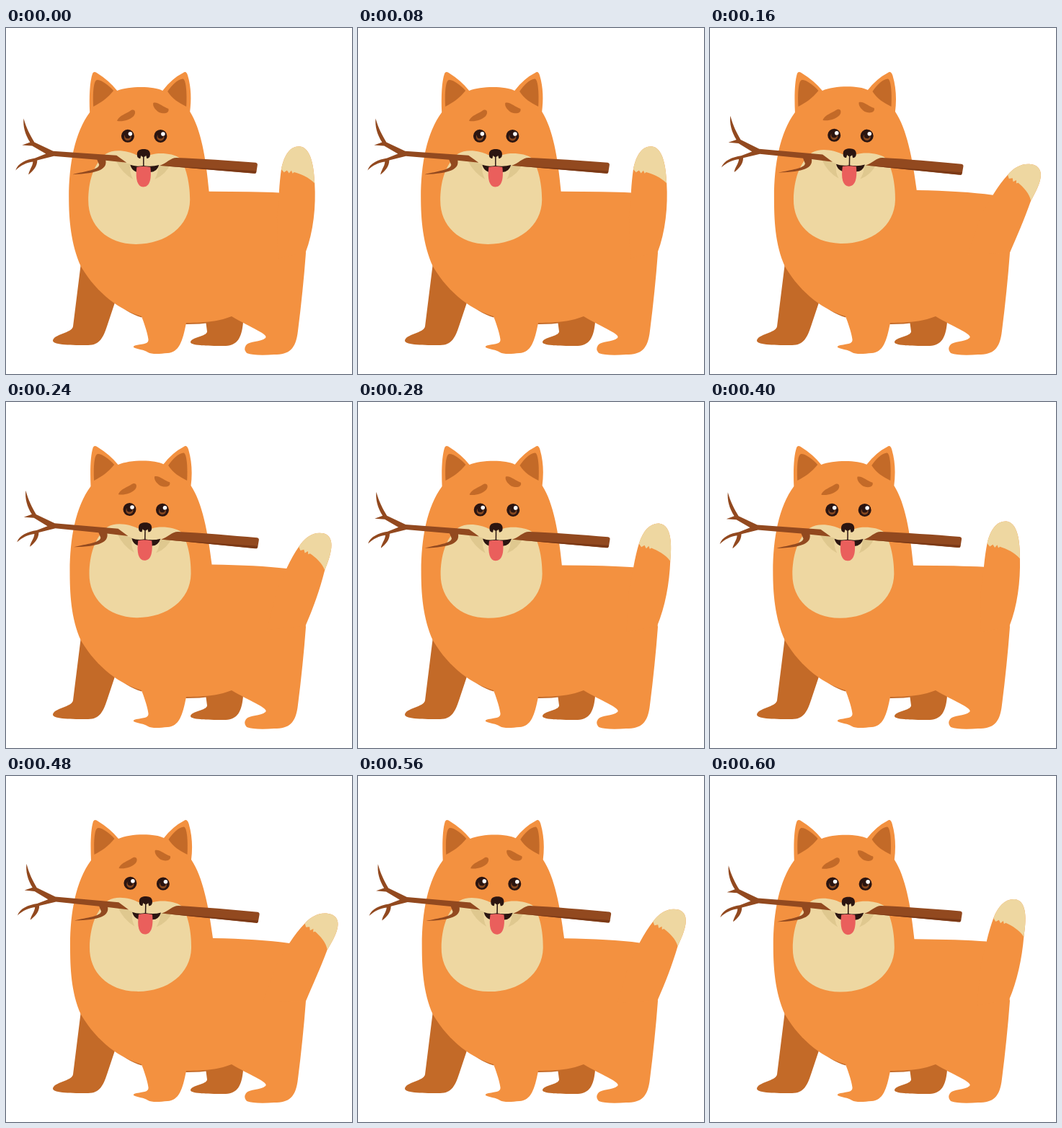
These frames come from a looping animation (480 by 480 pixels, 0.64 s). An HTML page:

```html
<!DOCTYPE html>
<html lang="en">
<head>
<meta charset="utf-8">
<title>Dog with a stick</title>
<style>
html, body { margin: 0; width: 100%; height: 100%; overflow: hidden; background: #fff; }
svg { display: block; width: 100vw; height: 100vh; }
.coat { fill: #f39140; }
.dark { fill: #c36a28; }
.cream { fill: #eed7a1; }
.shade { fill: #dfc88f; }
.bark { fill: #92491f; }
.ink { fill: #2b1511; }
</style>
</head>
<body>
<svg viewBox="0 0 480 480">
  <!-- far legs and belly shadow -->
  <g class="dark">
    <path d="M104 326L93 414C92 423 65 425 65 434C66 440 92 440 114 440C130 440 135 429 140 414L152 378Z"/>
    <path d="M277 406L279 421C279 428 256 429 256 436C257 441 284 441 305 441C321 440 327 430 329 408L313 398Z"/>
    <path d="M148 376C160 389 174 397 188 401.500L194 396ZM249 411Q290 411 314 401L250 402Z"/>
  </g>
  <path id="body" class="coat"/>
  <g id="tail">
    <path id="brush" class="coat"/>
    <path id="tip" class="cream"/>
  </g>
  <g id="ears" class="dark">
    <path d="M121 109C120 92 121 73 126 72C133 72 143 80 149 87C141 97 131 104 121 109Z"/>
    <path d="M250 109C251 92 250 71 245 70.500C237 72 230 79 224 88C230 98 240 104 250 109Z"/>
  </g>
  <g id="brows" class="dark">
    <path d="M154 128C158 121 166 119 172 115C178 111 181 117 177 122C171 128 162 130 154 129Z"/>
    <path d="M204 104C210 102 218 110 225 112C227 118 219 120 212 117C206 113 203 108 204 104Z"/>
  </g>
  <g id="face">
    <path class="cream" d="M138 175C150 167 170 171 180 176H200C212 172 232 174 240 180C249 190 255 215 255 238C255 275 222 300 180 300C140 300 114 274 114 240C114 215 120 190 138 175Z"/>
    <path class="shade" d="M152 184L172 189Q171 202 176 210Q160 201 152 184ZM228 188L211 191Q211 202 206 210Q222 203 228 188Z"/>
    <g class="bark">
      <path d="M65 171L153 177L167 187L138 184C140 196 128 202 92 203.500C110 199 128 197 129 190L126 183L66 178L43 184C43 193 37 199 31 204C31 199 37 192 37 186C29 187 20 191 13 198C16 188 28 183 40 181L55 175L36 164L22 163L33 159C26 148 23 137 24 126C28 140 33 149 39 159Z"/>
      <path d="M213 191C222 188 228 180 236 180C270 181 310 184 346 186.500Q349 187 348.500 190L347 200Q346 202 343 201.500L240 193Z"/>
      <path fill="#7b3916" d="M216 191L347 198L346 201.500L240 193Z"/>
    </g>
    <path class="ink" d="M172 190Q180 193 190 191Q202 193 212 190Q209 200 200 200H181Q174 198 172 190Z"/>
    <path fill="#ea5f5c" d="M181 193Q190 191 200 193C202 210 199 220.500 190 220.500C182 220 179 210 181 193Z"/>
    <path d="M190.500 177V192" stroke="#2b1511" stroke-width="1.500"/>
    <path class="ink" d="M181.500 174C182 169.500 186 168 191 168C196 168 199 170 199.500 174C200 179 198 181 195 181L194 177Q190 181 187 177L186 181C183 181 181 179 181.500 174Z"/>
    <g id="eye">
      <circle class="ink" cx="168.500" cy="150" r="9"/>
      <circle fill="#87481f" cx="168.500" cy="151.500" r="5"/>
      <circle class="ink" cx="168.500" cy="149.500" r="4"/>
      <circle fill="#fff" cx="172" cy="147" r="2.800"/>
    </g>
    <use href="#eye" x="45.500"/>
  </g>
</svg>
<script>
const STEP = 40;
// tail angle in degrees, two wags per loop
const wag = [3, -2, 3, 15, 27.7, 31.5, 22, 9, 0, -2, 5, 17.5, 29, 32, 24.5, 11.7];
const el = id => document.getElementById(id);
const move = (id, value) => el(id).setAttribute('transform', value);
const shape = (id, d) => el(id).setAttribute('d', d);
// A path point that shifts by (dx, dy) as the lean goes from 0 to 1.
const bend = k => (x, y, dx = 0, dy = 0) => `${x + dx * k} ${y + dy * k} `;

// The feet stay put while the head and back lean.
function bodyPath(p) {
  return 'M' + p(116, 117, 2) +
    'C' + p(115, 95, 2) + p(116, 74, 1.5) + p(120, 63, 1) +
    'Q' + p(122, 59, 1) + p(127, 63, 1) +
    'Q' + p(143, 73, 1.5) + p(154, 87, 2) +
    'C' + p(170, 80.5, 2, -1) + p(205, 80.5, 2, -1) + p(217, 87, 2, -1) +
    'Q' + p(230, 70, 1.5) + p(246, 62, 1) +
    'Q' + p(250, 59, 1) + p(252, 66, 1.5) +
    'C' + p(257, 83, 1.5) + p(257, 100, 2) + p(255, 116, 2) +
    'C' + p(270, 140, 3) + p(277, 180, 4) + p(281, 227, 6, -2) +
    'Q' + p(345, 227, 5, -1) + p(377, 228, 16, 4) +
    'L' + p(412, 290) + 'L' + p(416, 312) +
    'Q412 365 405 420C402 446 393 453 372 453Q345 455 334 451Q329 446 333 440' +
    'C338 434 353 436 360 430C365 425 340 416 313 400C298 406 280 409 250 409' +
    'C245 435 240 450 224 451C214 452 202 453 197 450C192 446 182 446 177 443' +
    'Q176 441 181 440C192 438 198 438 197.500 432C196 421 191 408 188 400' +
    'C160 392 127 370 104 331' +
    'C' + p(90, 300) + p(87, 265, 2) + p(87, 235, 2, -1) +
    'C' + p(87, 190, 2) + p(95, 145, 2) + p(116, 117, 2) + 'Z';
}

// The tail's end bends a little on top of its turn.
function tailEnd(p) {
  return 'C' + p(381, 174, 0, 8) + p(389, 162.5, 1, 7) + p(401, 162.5, 4, 4.5) +
    'C' + p(417, 163, 6, 3) + p(423, 190, 1) + p(425.5, 213, -2.5);
}

function tailPaths(p) {
  const brush = 'M' + p(376, 262, -5) + 'L' + p(377, 228, -4.5, 2.5) +
    'Q' + p(377, 210, -3) + p(378, 196) + tailEnd(p) +
    'C' + p(429, 245, -2, -5) + p(427, 282, 2, -17) + p(416, 312, 15.4, -23) +
    'L380 320Z';
  const tip = 'M' + p(378, 196) + tailEnd(p) +
    'C417 205 405 201 396 199L394 201L392 197L389 201L386 197L382 200Z';
  return [brush, tip];
}

function draw(now) {
  const angle = wag[Math.floor(now / STEP) % wag.length];
  const k = angle / 29;
  const p = bend(k);
  const [brush, tip] = tailPaths(p);
  shape('body', bodyPath(p));
  shape('brush', brush);
  shape('tip', tip);
  move('tail', `rotate(${angle} 380 271)`);
  move('ears', `translate(${1.5 * k} 0)`);
  move('brows', `translate(${2.8 * k} ${-k})`);
  move('face', `translate(${3.4 * k} ${-0.9 * k}) rotate(${1.2 * k} 190 174)`);
  requestAnimationFrame(draw);
}
draw(performance.now());
</script>
</body>
</html>
```
